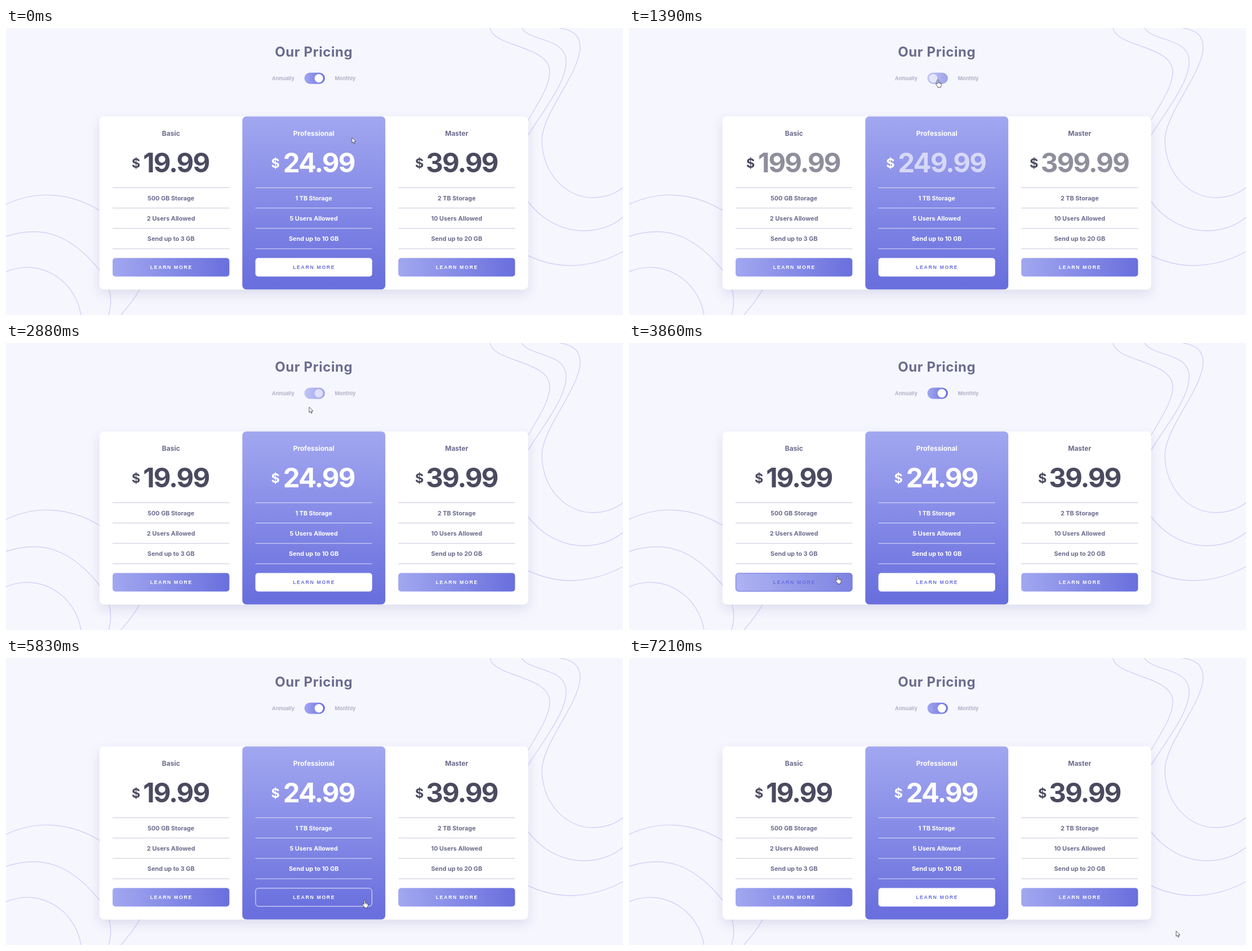
Animation of 1095x511 px, one loop 7280 ms. Source, as an HTML page with a canvas:

```html
<!DOCTYPE html>
<html lang="en">
<head>
<meta charset="utf-8">
<title>Our Pricing</title>
<style>
  html, body { margin: 0; width: 100%; height: 100%; overflow: hidden; background: #f6f6ff; }
  canvas { display: block; width: 1095px; height: 511px; }
</style>
</head>
<body>
<canvas id="stage"></canvas>
<script>
const W = 1095, H = 511, LOOP = 7280;
const canvas = document.getElementById('stage');
const ctx = canvas.getContext('2d');
const dpr = window.devicePixelRatio || 1;
canvas.width = W * dpr;
canvas.height = H * dpr;

const LIGHT = '#a2a7f0', DEEP = '#696fdd', GREY = '#6b6c8d', DARK = '#4a4a60';
const SANS = 'Inter, "Open Sans", sans-serif';
const ARIAL = '"Liberation Sans", Arial, sans-serif';

const plans = [
  { x: 166, name: 'Basic', month: '19.99', year: '199.99',
    rows: ['500 GB Storage', '2 Users Allowed', 'Send up to 3 GB'], hover: [3810, 4660] },
  { x: 419.4, name: 'Professional', month: '24.99', year: '249.99', pro: true,
    rows: ['1 TB Storage', '5 Users Allowed', 'Send up to 10 GB'], hover: [4920, 5925] },
  { x: 673, name: 'Master', month: '39.99', year: '399.99',
    rows: ['2 TB Storage', '10 Users Allowed', 'Send up to 20 GB'], hover: [6150, 6890] }
];
const TO_YEAR = 990, TO_MONTH = 2210;
const toggleHover = [690, 2820];

// Pointer stops: time, x, y; a trailing 1 eases the way there.
const stops = [
  [30, 614, 195], [780, 547, 92, 1], [2760, 547, 92], [2880, 538, 114], [3660, 373, 406, 1],
  [3800, 371, 409.5], [3860, 369, 415], [4000, 368, 418], [4420, 368, 418], [4660, 396, 421],
  [4920, 443, 422], [4950, 455, 422], [5160, 501, 424], [5600, 590, 429], [5830, 635, 431],
  [5925, 651, 431], [6150, 697, 430], [6670, 815, 429], [6890, 878, 443], [7210, 971, 486, 1]
];

const waves = [
  'M859 0C864 34 965 31 965 78C965 104 943 135 924 169',
  'M915 0C930 25 994 16 994 60C994 99 951 150 924 195',
  'M983 0C1008 4 1019 14 1019 36C1016 84 951 152 951 201C953 260 993 302 1043 302C1066 301 1083 294 1095 284',
  'M924 306C947 338 982 360 1024 361C1053 361 1077 352 1095 337',
  'M924 404C950 417 976 423 1004 423C1036 422 1068 413 1095 398',
  'M0 314C48 291 109 289 168 326',
  'M0 371C60 352 109 364 160 424C183 451 191 481 182 511',
  'M0 434C61 408 124 450 133 511',
  'M240 460C229 482 217 495 204 511'
].map(d => new Path2D(d));

const arrow = new Path2D('M0 0V9.8L2.3 7.8L3.8 11.3L5.3 10.6L3.9 7.2H7Z');
const hand = new Path2D('M0 1Q0 0 1 0Q2.1 0 2.1 1V5Q3.4 4.4 4 5.3Q5.3 4.9 5.7 5.9Q7.3 5.5 7.3 7V9.5' +
  'Q7.3 11 6.3 12V13.8H.9V12.3L-2.5 8.5Q-3.2 7.2-2 6.9Q-1 6.8 0 8Z');

const clamp = v => Math.max(0, Math.min(1, v));
const smooth = v => v * v * (3 - 2 * v);
const ramp = (t, from, span) => smooth(clamp((t - from) / span));
const pulse = (t, [on, off], span) => ramp(t, on, span) - ramp(t, off, span);
const inside = (t, [on, off]) => t >= on && t < off;

function box(x, y, w, h, r, fill) {
  ctx.beginPath();
  ctx.roundRect(x, y, w, h, r);
  ctx.fillStyle = fill;
  ctx.fill();
}

function blend(x0, y0, x1, y1) {
  const g = ctx.createLinearGradient(x0, y0, x1, y1);
  g.addColorStop(0, LIGHT);
  g.addColorStop(1, DEEP);
  return g;
}

function text(str, x, y, size, color, { weight = 700, family = SANS, gap = 0 } = {}) {
  ctx.font = `${weight} ${size}px ${family}`;
  ctx.letterSpacing = gap + 'px';
  ctx.textAlign = 'center';
  ctx.fillStyle = color;
  ctx.fillText(str, x, y);
}

function drawBackdrop() {
  ctx.fillStyle = '#f6f6ff';
  ctx.fillRect(0, 0, W, H);
  ctx.strokeStyle = '#d3d2f6';
  ctx.lineWidth = 1.4;
  waves.forEach(w => ctx.stroke(w));
}

function drawHeader(t) {
  text('Our Pricing', 546.3, 50.5, 24, GREY, { gap: 0.6 });
  text('Annually', 492, 93, 9.2, '#b3b4c7');
  text('Monthly', 602, 93, 9.2, '#b3b4c7');
  const [on, off] = toggleHover;
  ctx.globalAlpha = 1 - 0.38 * pulse(t, [on, off + 70], 90);
  box(529.5, 79.5, 36.5, 20, 10, blend(529.5, 0, 566, 0));
  const slide = pulse(t, [TO_YEAR, TO_MONTH], 220);
  ctx.beginPath();
  ctx.arc(555.2 - 15.2 * slide, 89.6, 7.6, 0, Math.PI * 2);
  ctx.fillStyle = '#fff';
  ctx.fill();
  ctx.globalAlpha = 1;
}

function drawPanel() {
  ctx.save();
  ctx.shadowColor = 'rgba(90, 92, 150, 0.17)';
  ctx.shadowBlur = 20 * dpr;
  ctx.shadowOffsetY = 8 * dpr;
  box(166, 157.5, 760.5, 308, 8, '#fff');
  ctx.restore();
  box(166, 157.5, 760.5, 308, 8, '#fff');
  box(419.4, 157.5, 253.8, 308, 7, blend(0, 157.5, 0, 455));
}

function drawPrice(plan, mid, t) {
  const color = plan.pro ? '#fff' : DARK;
  const yearly = inside(t, [TO_YEAR, TO_MONTH]);
  const since = t - (yearly ? TO_YEAR : TO_MONTH);
  const fade = since < 0 ? 1 : clamp(since / 550) ** 1.5;
  const lead = plan.pro ? 68 : plan.name === 'Basic' ? 62 : 66.2;
  text('$', mid - (yearly ? (plan.pro ? 82.3 : plan.name === 'Basic' ? 77 : 81.2) : lead), 248.5, 23.5, color);
  ctx.globalAlpha = fade;
  text(yearly ? plan.year : plan.month, mid + 9, 256.5, 47.5, color, { gap: -2 });
  ctx.globalAlpha = 1;
}

function drawButton(plan, mid, t) {
  const x = mid - 103.6, w = 207.2, y = 409.5, h = 33;
  const hot = inside(t, plan.hover);
  const ink = plan.pro !== hot && (plan.pro || hot) ? DEEP : '#fff';
  ctx.globalAlpha = 1 - pulse(t, plan.hover, 220);
  box(x, y, w, h, 5, plan.pro ? '#fff' : blend(x, 0, x + w, 0));
  ctx.globalAlpha = 1;
  if (hot) {
    ctx.beginPath();
    ctx.roundRect(x + 0.4, y + 0.4, w - 0.8, h - 0.8, 5);
    ctx.strokeStyle = plan.pro ? '#fff' : DEEP;
    ctx.lineWidth = 0.9;
    ctx.stroke();
  }
  text('LEARN MORE', mid + 0.5, 429.4, 8.8, ink, { family: ARIAL, gap: 1.6 });
}

function drawPlan(plan, t) {
  const mid = plan.x + 126.8;
  const color = plan.pro ? '#fff' : GREY;
  text(plan.name, mid, 192, 12, color);
  drawPrice(plan, mid, t);
  ctx.fillStyle = plan.pro ? 'rgba(255, 255, 255, 0.75)' : '#c6c6d8';
  for (let i = 0; i < 4; i++) ctx.fillRect(mid - 103.6, 283.8 + i * 36.25, 207.2, 1);
  plan.rows.forEach((row, i) => text(row, mid, 306.6 + i * 36.25, 10.8, color));
  drawButton(plan, mid, t);
}

function pointerAt(t) {
  const n = stops.findIndex(s => s[0] > t);
  if (n === 0) return stops[0].slice(1, 3);
  if (n < 0) return stops[stops.length - 1].slice(1, 3);
  const [t0, x0, y0] = stops[n - 1];
  const [t1, x1, y1, eased] = stops[n];
  const p = (t - t0) / (t1 - t0);
  const k = eased ? smooth(p) : p;
  return [x0 + (x1 - x0) * k, y0 + (y1 - y0) * k];
}

function drawPointer(t) {
  const [x, y] = pointerAt(t);
  const over = inside(t, toggleHover) || plans.some(p => inside(t, p.hover));
  const shape = over ? hand : arrow;
  ctx.save();
  ctx.translate(x, y);
  ctx.fillStyle = '#fff';
  ctx.fill(shape);
  ctx.strokeStyle = '#33344a';
  ctx.lineWidth = 0.8;
  ctx.lineJoin = 'round';
  ctx.stroke(shape);
  if (over) {
    ctx.beginPath();
    for (const [fx, fy] of [[2.1, 5], [4, 5.4], [5.7, 6]]) {
      ctx.moveTo(fx, fy);
      ctx.lineTo(fx, fy + 2);
    }
    ctx.lineWidth = 0.6;
    ctx.stroke();
  }
  ctx.restore();
}

const start = performance.now();
function frame() {
  const t = (performance.now() - start) % LOOP;
  ctx.setTransform(dpr, 0, 0, dpr, 0, 0);
  drawBackdrop();
  drawHeader(t);
  drawPanel();
  plans.forEach(p => drawPlan(p, t));
  drawPointer(t);
  requestAnimationFrame(frame);
}
frame();
</script>
</body>
</html>
```
